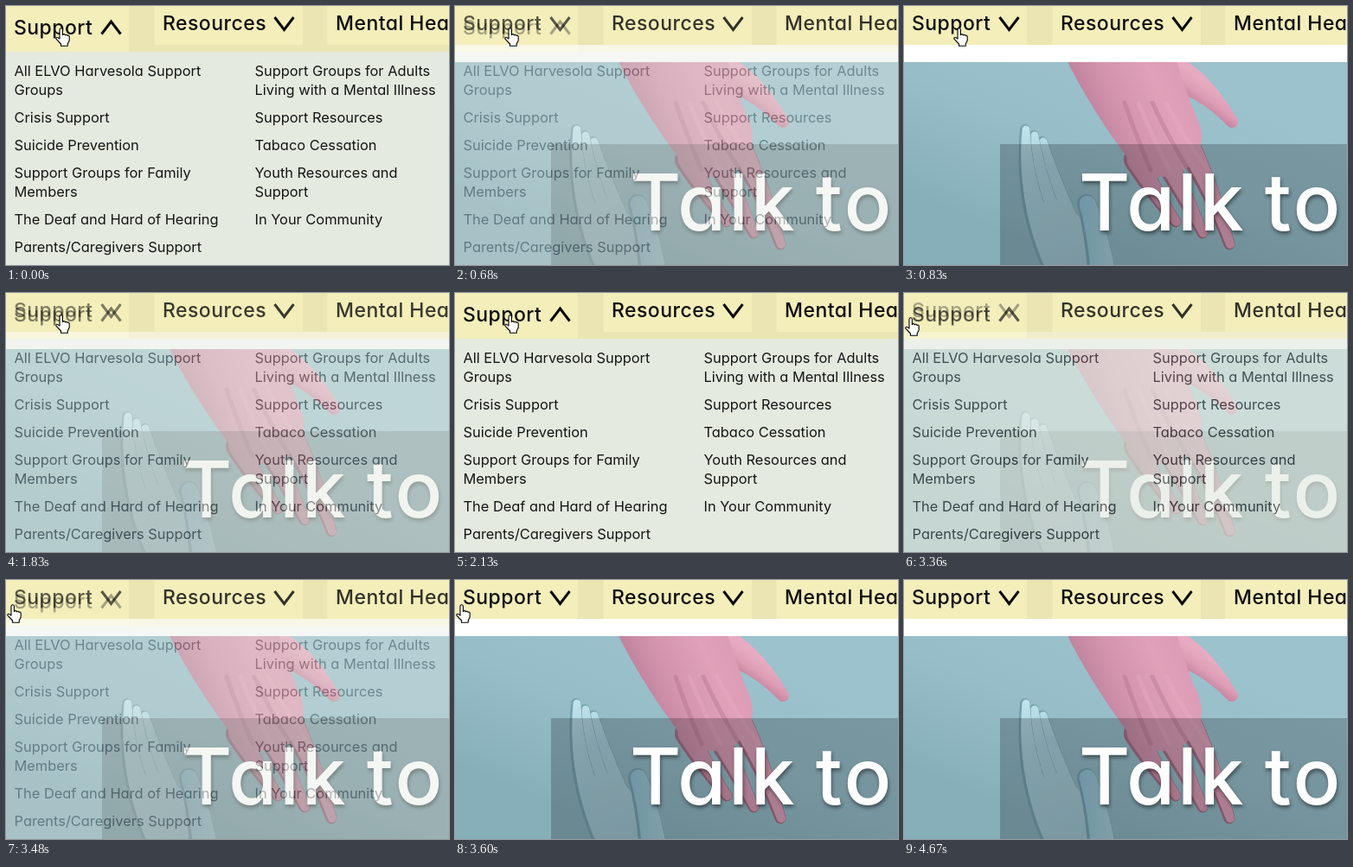
An HTML page with a canvas for the animation above (5200 ms loop, 512 by 300 pixels).

```html
<!DOCTYPE html>
<html lang="en">
<head>
<meta charset="utf-8">
<title>Menu</title>
<style>
  html, body { margin: 0; width: 100%; height: 100%; overflow: hidden; background: #fff; }
  canvas, svg { position: absolute; left: 0; top: 0; width: 512px; height: 300px; }
  text { font-family: Inter, "Open Sans", sans-serif; font-feature-settings: "cv11"; white-space: pre; }
  .nav text { font-size: 23px; font-weight: 500; letter-spacing: .02em; fill: #0b0b0b; }
  .nav path { fill: none; stroke: #0b0b0b; stroke-width: 3; }
  .menu text { font-size: 16.4px; fill: #141616; }
  .title {
    font-size: 91px; font-weight: 500; letter-spacing: .03em; word-spacing: -.06em;
    fill: #fff; text-shadow: 1px 3px 4px rgba(0, 0, 0, .45);
  }
  .button { fill: #f3eeba; }
  .bar { fill: #ebe5b3; }
  .cursor { fill: #fff; stroke: #000; stroke-width: 1.1; stroke-linejoin: round; }
</style>
</head>
<body>
<canvas id="photo" width="512" height="300"></canvas>
<svg viewBox="0 0 512 300">
  <text class="title" x="202" y="260">Talk to</text>
  <rect class="bar" width="512" height="45"/>
  <rect class="button" width="142" height="45"/>
  <g id="open">
    <rect class="bar" width="512" height="53"/>
    <rect class="button" width="142" height="53"/>
    <rect y="53" width="512" height="247" fill="#e4eae0"/>
    <g class="menu" id="menu"></g>
  </g>
  <rect class="button" x="171.5" width="171.5" height="45"/>
  <rect class="button" x="371.5" width="141" height="45"/>
  <g class="nav" id="others">
    <text x="181" y="28">Resources</text>
    <path d="M310.5 13l11 14.5 11-14.5"/>
    <text x="381" y="28">Mental Health</text>
  </g>
  <g class="nav" id="supportClosed">
    <text x="9" y="28">Support</text>
    <path d="M110.5 13l11 14.5 11-14.5"/>
  </g>
  <g class="nav" id="supportOpen">
    <text x="9" y="32.5">Support</text>
    <path d="M110.5 32.5l11-14.5 11 14.5"/>
  </g>
  <path class="cursor" id="hand" d="M5 13V2.5a1.7 1.7 0 0 1 3.4 0v6a1.6 1.6 0 0 1 3 .3 1.5 1.5 0 0 1 2.6.6 1.4 1.4 0 0 1 2.2 1.2V15l-2 4v2.2H6.5V19L1 13.2c-.9-1.2.6-2.6 2-1.6z"/>
  <path class="cursor" id="arrow" d="M.5.5V16l3.6-3.4 2.4 5.6 2.4-1-2.4-5.5h5z"/>
</svg>
<script>
const $ = id => document.getElementById(id);
const LOOP = 5200;

function addColumn(x, items) {
  let y = 81;
  for (const item of items) {
    for (const line of item.split("\n")) {
      const t = document.createElementNS("http://www.w3.org/2000/svg", "text");
      t.setAttribute("x", x);
      t.setAttribute("y", y);
      t.textContent = line;
      $("menu").append(t);
      y += 22;
    }
    y += 10;
  }
}

addColumn(9.5, ["All ELVO Harvesola Support\nGroups", "Crisis Support", "Suicide Prevention",
  "Support Groups for Family\nMembers", "The Deaf and Hard of Hearing",
  "Parents/Caregivers Support"]);
addColumn(287.5, ["Support Groups for Adults\nLiving with a Mental Illness",
  "Support Resources", "Tabaco Cessation", "Youth Resources and\nSupport",
  "In Your Community"]);

const ctx = $("photo").getContext("2d");
const mix = (a, b, p) => a + (b - a) * p;

function gradient(x0, y0, x1, y1, ...colors) {
  const g = ctx.createLinearGradient(x0, y0, x1, y1);
  colors.forEach((c, i) => g.addColorStop(i / (colors.length - 1), c));
  return g;
}

// Limb that narrows from r0 to r1 along a quadratic curve
function taper(x0, y0, cx, cy, x1, y1, r0, r1, fill) {
  ctx.fillStyle = fill;
  ctx.beginPath();
  for (let t = 0; t <= 1; t += 1 / 128) {
    const x = mix(mix(x0, cx, t), mix(cx, x1, t), t);
    const y = mix(mix(y0, cy, t), mix(cy, y1, t), t);
    const r = mix(r0, r1, t);
    ctx.moveTo(x + r, y);
    ctx.arc(x, y, r, 0, 7);
  }
  ctx.fill();
}

// Limb with a darker rim on its left side
function limb(x0, y0, cx, cy, x1, y1, r0, r1, rim, fill) {
  taper(x0, y0, cx, cy, x1, y1, r0, r1, rim);
  taper(x0 + 1.5, y0, cx + 1.5, cy, x1 + 1, y1, r0 - 2, r1 - 1.5, fill);
}

function drawPinkHand() {
  const skin = gradient(205, 140, 340, 80, "#b77d97", "#d393ad", "#dfa0b8", "#dc9ab3");
  const thumb = gradient(345, 122, 362, 98, "#bf7f99", "#dd9db5", "#e6abc0");
  for (let i = 0; i < 3; i++) {
    limb(268 + 32 * i, 178 - 4 * i, 288 + 34 * i, 215, 314 + 31 * i, 250 + 13 * i,
      14, 6.5, "#a46c85", skin);
  }
  taper(312, 78, 347, 92, 379, 134, 20, 7, thumb);
  taper(246, 40, 265, 95, 298, 152, 62, 46, skin);

  ctx.lineCap = "round";
  ctx.lineWidth = 5;
  for (let i = 0; i < 4; i++) {
    ctx.strokeStyle = i % 2 ? "rgba(240,180,200,.25)" : "rgba(150,90,118,.25)";
    ctx.beginPath();
    ctx.moveTo(255 + 16 * i, 112);
    ctx.quadraticCurveTo(268 + 18 * i, 150, 285 + 22 * i, 190);
    ctx.stroke();
  }
}

function drawBlueHand() {
  const skin = gradient(140, 135, 190, 300, "#c4e5ee", "#a6cfdb", "#a3c8d3", "#9dc3cf");
  const rim = "#749fae";
  for (let i = 2; i >= 0; i--) {
    limb(172 + 16 * i, 290, 138 + 18 * i, 220 - 2 * i, 140 + 10 * i, 143 + 7 * i,
      17, 6, rim, skin);
  }
  taper(205, 312, 195, 280, 174, 246, 40, 22, skin);
  limb(228, 305, 222, 262, 211, 229, 16, 11, rim, gradient(200, 0, 240, 0, "#8cbfd3", "#a3cad6"));
}

function drawPhoto() {
  ctx.beginPath();
  ctx.rect(0, 65, 512, 235);
  ctx.clip();
  ctx.fillStyle = gradient(300, 65, 200, 300, "#9bc2cd", "#96bdc8", "#87afba");
  ctx.fillRect(0, 65, 512, 235);
  drawPinkHand();
  drawBlueHand();
  ctx.fillStyle = "rgba(22,24,30,.25)";
  ctx.fillRect(111, 160, 401, 140);
}

// Progress from 0 to 1 in n hard steps, the first one at the start time
function stepped(t, start, n, ms) {
  const k = Math.floor((t - start) / ms) + 1;
  return Math.min(Math.max(k / n, 0), 1);
}

const easeOut = p => 1 - (1 - p) ** 1.4;

function place(id, visible, x, y) {
  $(id).style.display = visible ? "" : "none";
  $(id).setAttribute("transform", `translate(${x} ${y})`);
}

function render(now) {
  const t = now % LOOP;
  const a = 1 - stepped(t, 560, 3, 120) + stepped(t, 1830, 2, 150) - stepped(t, 3360, 3, 120);
  $("open").style.opacity = a;
  $("supportOpen").style.opacity = a;
  $("supportClosed").style.opacity = 1 - a;
  $("others").style.opacity = 1 - 0.8 * a * (1 - a);

  const left = easeOut(stepped(t, 2780, 3, 135));
  const away = easeOut(stepped(t, 4400, 2, 120));
  place("hand", t < 4250, mix(57, 1, left), mix(25, 28, left));
  place("arrow", t >= 4250 && t < 4670, mix(21, 297, away), mix(56, 247, away));
}

drawPhoto();
const start = performance.now();
(function frame() {
  render(performance.now() - start);
  requestAnimationFrame(frame);
})();
</script>
</body>
</html>
```
